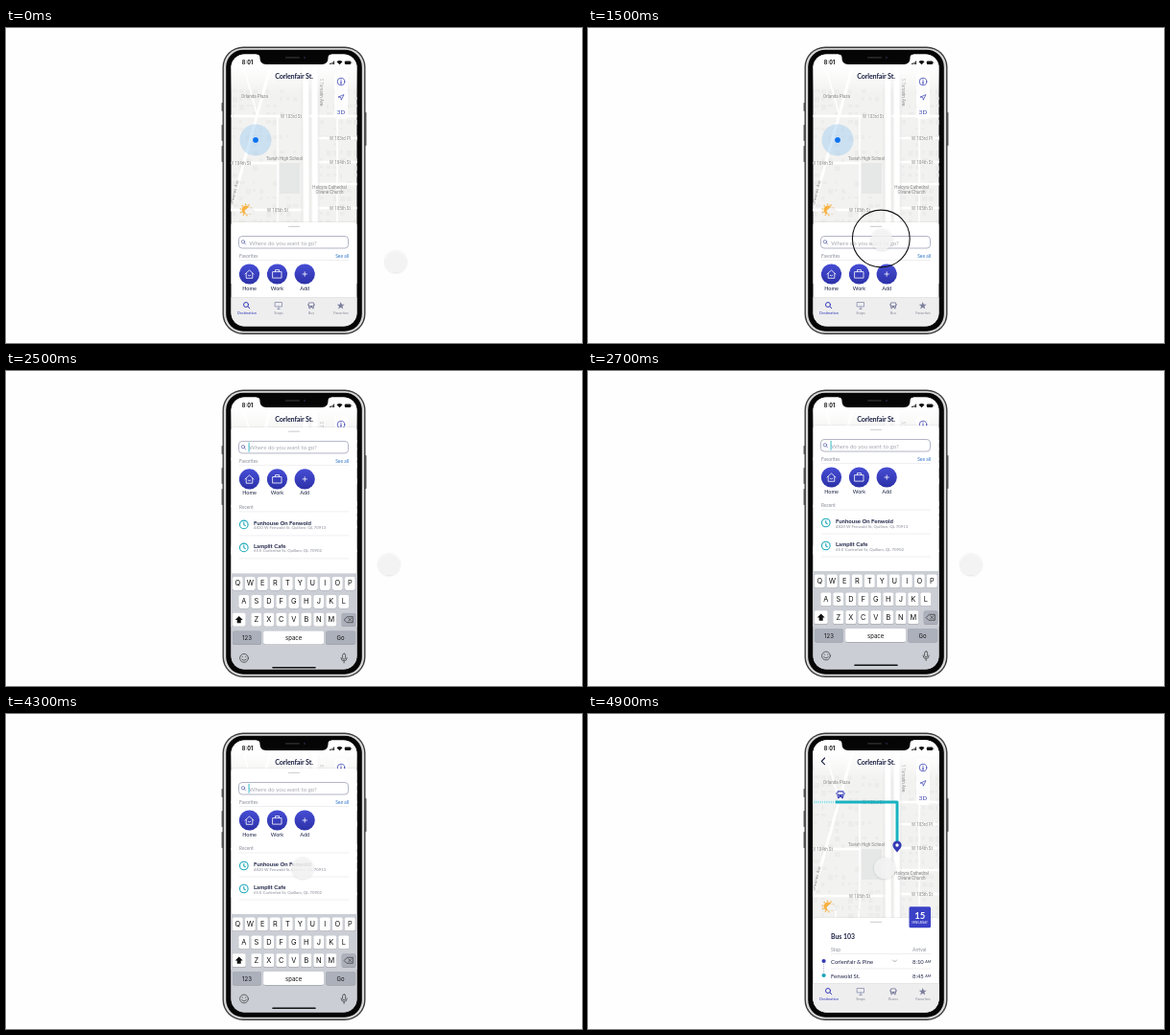
An HTML page that plays this animation: 600 px wide and 329 px high, repeating every 5000 ms.

```html
<!DOCTYPE html>
<html lang="en">
<head>
<meta charset="utf-8">
<title>Transit app demo</title>
<style>
  html, body { margin: 0; height: 100%; overflow: hidden; background: #fefefe; }
  svg { display: block; width: 100vw; height: 100vh; font-family: Lato, sans-serif; }
  text { dominant-baseline: central; }
  .ink { fill: #1c2244; }
  .mid { text-anchor: middle; }
  .end { text-anchor: end; }
  .bold { font-weight: 700; }
  .street { font: 4.5px Roboto, sans-serif; fill: #858585; text-anchor: middle; }
  .grey { fill: #8a8d99; }
  .key { font: 7.4px Inter, sans-serif; fill: #111; text-anchor: middle; }
  .line { fill: none; stroke-linecap: round; stroke-linejoin: round; }
</style>
</head>
<body>
<svg viewBox="0 0 600 329" preserveAspectRatio="none">
  <defs>
    <clipPath id="screen"><rect x="234.5" y="27.5" width="131" height="284" rx="14"/></clipPath>
    <linearGradient id="haze" x2="0" y2="1">
      <stop offset=".3" stop-color="#fff"/><stop offset="1" stop-color="#fff" stop-opacity="0"/>
    </linearGradient>
    <linearGradient id="indigo" x2="0" y2="1">
      <stop stop-color="#464dd4"/><stop offset="1" stop-color="#2c31a8"/>
    </linearGradient>
    <filter id="soft" x="-50%" y="-50%" width="200%" height="200%">
      <feDropShadow dx="0" dy=".5" stdDeviation=".8" flood-opacity=".2"/>
    </filter>

    <g id="map">
      <rect x="234" y="27" width="132" height="240" fill="#f2f2f1"/>
      <g id="blocks" fill="#ececeb"></g>
      <rect x="285" y="141" width="21" height="32" fill="#e6e7e7"/>
      <g class="line" stroke="#fff">
        <path stroke-width="2.600" d="M234 92H366M234 141H283M234 190H308M326 115H366M326 140H366M326 163H366M326 188H366"/>
        <path stroke-width="1.600" d="M283 92V203M258 206V240M282 206V240M345 92V240M244 28L262 92"/>
        <path stroke-width="3" d="M279 28L234 190"/>
        <path stroke-width="5.500" d="M312 28L313 240M321.500 28L322 240"/>
      </g>
      <path d="M316.700 28V240M308 28V240M326 28V240" stroke="#e6e6e6" stroke-width=".7"/>
      <g class="street">
        <text x="259" y="71">Orlanda Plaza</text>
        <text x="297" y="92">W 103rd St</text>
        <text x="348" y="115">W 103rd Pl</text>
        <text x="244" y="141.500">W 104th St</text>
        <text x="348" y="140">W 104th St</text>
        <text x="290" y="136.500">Tavish High School</text>
        <text x="337" y="166.700">Halcyra Cathedral</text>
        <text x="337" y="171.700">Olvane Church</text>
        <text x="283" y="190">W 105th St</text>
        <text x="348" y="188.500">W 105th St</text>
        <text transform="translate(328 67) rotate(90)">S Tamarin Ave</text>
        <text transform="translate(238 172) rotate(-76)">Orwenes Ave</text>
      </g>
      <rect x="234" y="27" width="132" height="42" fill="url(#haze)"/>
      <rect x="342" y="47" width="14" height="48" rx="3" fill="#fff" fill-opacity=".85"/>
      <g class="line" stroke="#3b44b4" stroke-width=".8">
        <circle cx="349" cy="56" r="3.800"/>
        <path stroke-width="1.200" d="M349 54v.1M349 55.800v2.400"/>
        <path stroke-width=".7" d="M346.300 72L352 69.600L349.300 75.200L348.800 72.600Z"/>
      </g>
      <text class="mid" x="349" y="87.300" font-size="6.200" fill="#3b44b4">3D</text>
    </g>

    <g id="weather">
      <circle r="5.800" fill="none" stroke="#f6b24a" stroke-width="1.400" stroke-dasharray="1.300 2.340"/>
      <circle r="4.500" fill="#f8b13d"/>
      <path d="M.5 4a2.500 2.500 0 0 1 0 -4.800a3.300 3.300 0 0 1 6 .2a2.300 2.300 0 0 1 0 4.600Z" fill="#f3f3f3" stroke="#ddd" stroke-width=".3"/>
    </g>
    <g id="bus">
      <rect x="-3" y="-3.300" width="6" height="5.800" rx="1"/>
      <path d="M-2.500 2h1.500v1.600h-1.500zM1 2h1.500v1.600h-1.500zM-3.900 -1.800h.6v2h-.6zM3.300 -1.800h.6v2h-.6z"/>
      <path d="M-2.200 -2.200h4.400v2.200h-4.400zM-2.100 1h1v.8h-1zM1.100 1h1v.8h-1z" fill="#fff"/>
    </g>
    <g id="tabs">
      <rect x="234" y="281.500" width="132" height="31" fill="#eeeeef" fill-opacity=".95"/>
      <path d="M234 281.500H366" stroke="#d2d2d5" stroke-width=".5"/>
      <g class="line" stroke="#373fb8" stroke-width="1"><circle cx="250" cy="289" r="2.500"/><path d="M252 291L253.800 292.800"/></g>
      <path class="line" stroke="#8a8eae" stroke-width=".8" d="M280.500 286.500h7v4.500h-7zM284 291v2.500M282.800 293.500h2.400"/>
      <use href="#bus" x="318" y="289.700" fill="#8083a0"/>
      <path d="M0 -4L1.100 -1.300L4 -1.200L1.700 .6L2.500 3.400L0 1.800L-2.500 3.400L-1.700 .6L-4 -1.200L-1.100 -1.300Z" transform="translate(348.700 290)" fill="#7b7e9c"/>
      <g class="mid grey" font-size="3.900">
        <text x="251" y="297.500" fill="#373fb8">Destination</text>
        <text x="284" y="297.500">Stops</text>
        <text x="349" y="297.500">Favorites</text>
      </g>
    </g>
    <g id="panel">
      <path d="M234 130V4a4 4 0 0 1 4 -4H362a4 4 0 0 1 4 4V270H234Z" fill="#fff" filter="url(#soft)"/>
      <path class="line" d="M294.500 4.300H305.500" stroke="#d4d4d8" stroke-width="1.200"/>
    </g>
  </defs>

  <g fill="#666">
    <rect x="224.500" y="78" width="2" height="9" rx=".7"/>
    <rect x="224.500" y="101" width="2" height="17" rx=".7"/>
    <rect x="224.500" y="123" width="2" height="17" rx=".7"/>
    <rect x="373.500" y="88" width="2" height="35" rx=".7"/>
  </g>
  <rect x="225.500" y="19.500" width="149" height="300.500" rx="21.500" fill="#3c3c3c"/>
  <rect x="226.900" y="20.900" width="146.200" height="297.700" rx="20" fill="#d9d9d9"/>
  <rect x="229.200" y="22.700" width="141.600" height="294" rx="18" fill="#050505"/>

  <g clip-path="url(#screen)" class="ink">
    <use href="#map"/>
    <circle cx="260" cy="117" r="16.500" fill="#8fc2ee" fill-opacity=".4"/>
    <circle cx="260" cy="117" r="3.500" fill="#0d72ee" stroke="#fff" stroke-width=".8"/>
    <use href="#weather" id="sun"/>

    <g id="sheet">
      <use href="#panel"/>
      <rect x="242.500" y="14.500" width="114" height="12.500" rx="3.500" fill="#fff" stroke="#a0a3b8" stroke-width=".8"/>
      <g class="line" stroke="#5b63a8" stroke-width=".7"><circle cx="247" cy="20.300" r="1.700"/><path d="M248.300 21.600L249.700 23"/></g>
      <text x="253.200" y="21" font-size="6.100" fill="#a8a9b1">Where do you want to go?</text>
      <rect id="caret" x="252.600" y="15.800" width=".9" height="9.800" fill="#1fb4c4"/>
      <text class="grey" x="243" y="35" font-size="4.900">Favorites</text>
      <text class="end" x="357" y="35" font-size="4.900" fill="#2a72c8">See all</text>
      <path d="M243 39.500H357" stroke="#e4e4e8" stroke-width=".6"/>
      <g fill="url(#indigo)"><circle cx="253.500" cy="54" r="10.600"/><circle cx="282.500" cy="54" r="10.600"/><circle cx="311.200" cy="54" r="10.600"/></g>
      <g class="line" stroke="#fff" stroke-width=".8">
        <path d="M249 54L253.500 50L258 54M250.200 53.500V58.300H256.800V53.500M252.200 55.300q1.300 1.300 2.600 0"/>
        <path d="M278 51.600h9v6.500h-9zM280.500 51.500v-1.900h4v1.900"/>
        <path d="M309 54h4.400M311.200 51.800v4.400"/>
      </g>
      <g class="mid" font-size="5.500">
        <text x="253.500" y="68.500">Home</text><text x="282.500" y="68.500">Work</text><text x="311.200" y="68.500">Add</text>
      </g>
      <g id="recent">
        <text class="grey" x="243" y="83" font-size="4.900">Recent</text>
        <path d="M243 88H357M243 113H357M243 137H357" stroke="#e4e4e8" stroke-width=".6"/>
      </g>
    </g>
    <g id="bar">
      <use href="#tabs"/>
      <text class="mid grey" x="318" y="297.500" font-size="3.900">Bus</text>
    </g>
    <g id="keyboard"><rect x="234" y="209" width="132" height="104" fill="#cbced5"/></g>

    <g id="trip">
      <use href="#map"/>
      <path d="M235 92H258" stroke="#8fdde4" stroke-width="2.400" stroke-dasharray="1.300 .9"/>
      <path d="M258 92H322V133" fill="none" stroke="#18b2c0" stroke-width="3" stroke-linejoin="round"/>
      <use href="#bus" fill="#3a40b8" transform="translate(263 84) scale(1.150)"/>
      <path d="M322 144.500C319.500 141 317.400 139.500 317.400 137a4.600 4.600 0 0 1 9.200 0C326.600 139.500 324.500 141 322 144.500Z" fill="#343ab4"/>
      <circle cx="322" cy="137" r="1.700" fill="#fff"/>
      <use href="#weather" x="250" y="201"/>
      <use href="#panel" y="213"/>
      <rect x="334.500" y="201.300" width="22.500" height="22" rx="1.500" fill="#3a41c6"/>
      <g class="mid" fill="#fff">
        <text class="bold" x="345.700" y="210" font-size="9.500">15</text>
        <text x="345.700" y="217.800" font-size="2.900">MINS AWAY</text>
      </g>
      <text class="bold" x="253" y="232" font-size="6.900">Bus 103</text>
      <g font-size="5" class="grey"><text x="253" y="246">Stop</text><text x="338" y="246">Arrival</text></g>
      <path d="M253 250.500H357M253 266H357" stroke="#e2e2e6" stroke-width=".6"/>
      <g font-size="5.900">
        <text x="253" y="258">Corlenfair &amp; Pine</text><text x="253" y="273">Fenwold St.</text>
        <text x="338" y="258">8:10 <tspan font-size="3.700">AM</tspan></text><text x="338" y="273">8:45 <tspan font-size="3.700">AM</tspan></text>
      </g>
      <path class="line" d="M317.500 257L319.500 259L321.500 257" stroke="#888" stroke-width=".7"/>
      <path d="M245.600 261V270" stroke="#9a9db8" stroke-width=".8" stroke-dasharray="1 1"/>
      <circle cx="245.600" cy="258" r="2.100" fill="#343ab4"/>
      <circle cx="245.600" cy="273" r="2.100" fill="#18a5b8"/>
      <use href="#tabs"/>
      <text class="mid grey" x="318" y="297.500" font-size="3.900">Buses</text>
      <path class="line" d="M246.500 46L243.300 49.300L246.500 52.600" stroke="#1c2244" stroke-width="1.200"/>
    </g>

    <text class="mid bold" x="300" y="50" font-size="7.200" letter-spacing="-.15">Corlenfair St.</text>
    <text class="mid bold" x="251.500" y="36" font-size="5.500" font-family="Inter, sans-serif" fill="#111">8:01</text>
    <g fill="#111">
      <path d="M337 37h.9v1h-.9zM338.400 36.300h.9v1.700h-.9zM339.800 35.400h.9v2.600h-.9zM341.200 34.500h.9v3.500h-.9z"/>
      <path d="M347.500 38.300L344.500 35.300a4.200 4.200 0 0 1 6 0Z"/>
      <rect x="352.800" y="34.500" width="6.400" height="3.500" rx="1"/><rect x="359.600" y="35.500" width=".6" height="1.400"/>
    </g>
  </g>
  <path d="M261 27H339V27.500Q335.500 27.500 335.500 31V31.500Q335.500 38 329 38H271Q264.500 38 264.500 31.500V31Q264.500 27.500 261 27.500Z" fill="#050505"/>
  <rect x="291" y="30" width="15" height="1.800" rx=".9" fill="#262626"/><circle cx="311" cy="30.900" r="1.200" fill="#1b1f33"/>

  <circle id="ring" fill="none" stroke="#111" stroke-width="1.100"/>
  <circle id="finger" r="11" fill="#f5f5f5" fill-opacity=".85" filter="url(#soft)"/>
</svg>
<script>
const $ = id => document.getElementById(id);
const clamp = x => Math.min(1, Math.max(0, x));
const span = (t, from, to) => clamp((t - from) / (to - from));
const inOut = x => x < .5 ? 4 * x ** 3 : 1 - 4 * (1 - x) ** 3;
const out = x => 1 - (1 - x) ** 3;
const add = (id, markup) => $(id).insertAdjacentHTML('beforeend', markup);

// Faint buildings scattered over the map
let seed = 7;
const rand = () => (seed = seed * 16807 % 2147483647) / 2147483647;
for (let y = 64; y < 215; y += 8)
  for (let x = 236; x < 364; x += 7)
    if (rand() < .6 && (x < 302 || x > 326))
      add('blocks', `<rect x="${x}" y="${y}" width="${2 + 4 * rand()}" height="${2 + 4 * rand()}"/>`);

[['Funhouse On Fenwold', '4820 W Fenwold St, Quillam, QL 70913', 101.5],
 ['Lamplit Cafe', '65 E Corlenfair St, Quillam, QL 70902', 125.5]].forEach(([name, place, y]) =>
  add('recent', `<g class="line" stroke="#1aa9b8" stroke-width="1.1"><circle cx="247.8" cy="${y}" r="4.3"/>
    <path d="M247.800 ${y - 2.3}v2.500l1.500 1"/></g>
    <text class="bold" x="258" y="${y - 2}" font-size="6">${name}</text>
    <text class="grey" x="258" y="${y + 3.6}" font-size="4.3">${place}</text>`));

const key = (x, y, w, label = '', fill = '#fff', size = 7.4) => add('keyboard',
  `<rect x="${x - w / 2}" y="${y - 6.6}" width="${w}" height="14" rx="1.8" fill="#898c92"/>
   <rect x="${x - w / 2}" y="${y - 7}" width="${w}" height="14" rx="1.8" fill="${fill}"/>
   <text class="key" x="${x}" y="${y}" style="font-size:${size}px">${label}</text>`);
const dark = '#abb0bb';
[['QWERTYUIOP', 241.3, 219.5], ['ASDFGHJKL', 247.8, 238.5], ['ZXCVBNM', 260.8, 257.3]].forEach(([row, x, y]) =>
  [...row].forEach((c, i) => key(x + i * 13, y, 11, c)));
key(242.7, 257.3, 14);
key(357, 257.3, 14.5, '', dark);
key(251, 276, 30, '123', dark, 6);
key(299.6, 276, 63, 'space', '#fff', 6);
key(348.6, 276, 31, 'Go', dark, 6);
add('keyboard', `<path d="M242.700 253.500l4 4h-2v3.300h-4v-3.300h-2z" fill="#111"/>
  <g class="line" stroke="#444" stroke-width=".8">
    <path d="M352.500 257.300l2.800 -3h6v6h-6zM356.700 255.800l3 3m0 -3l-3 3"/>
    <circle cx="248" cy="297.500" r="4.400"/><path d="M246.300 296v.3M249.700 296v.3M245.700 298.800q2.300 2.600 4.600 0"/>
    <rect x="350.600" y="292.800" width="3" height="6" rx="1.500"/><path d="M349 297q0 3.500 3.100 3.500t3.100 -3.500M352.100 300.500v2"/>
  </g><path class="line" d="M278 307.300H322" stroke="#111" stroke-width="1.600"/>`);

// Each move: start, end, easing, then the point reached
const start = [406, 244];
const moves = [[700, 1250, inOut, 306, 221], [1900, 2520, out, 399, 202], [3100, 3650, inOut, 309, 161]];
const fingerAt = t => moves.reduce(([x, y], [a, b, ease, tx, ty]) => {
  const k = ease(span(t, a, b));
  return [x + (tx - x) * k, y + (ty - y) * k];
}, start);
const taps = [1300, 3850];

const set = (id, attrs) => Object.entries(attrs).forEach(([k, v]) => $(id).setAttribute(k, v));

function draw(now) {
  const t = now % 5000;
  const top = 203 - 146 * inOut(span(t, 1990, 2590));
  set('sheet', { transform: `translate(0 ${top})` });
  set('sun', { transform: `translate(250 ${top - 13})`, opacity: 1 - span(t, 1950, 2150) });
  set('recent', { opacity: span(t, 2000, 2150) });
  set('caret', { opacity: span(t, 2100, 2400) });
  set('bar', { opacity: 1 - span(t, 2100, 2500) });
  set('keyboard', { transform: `translate(0 ${105 * (1 - out(span(t, 2250, 2600)))})` });
  set('trip', { opacity: inOut(span(t, 4600, 4900)) });

  const [x, y] = fingerAt(t);
  set('finger', { cx: x, cy: y });
  const tap = taps.find(s => t >= s && t < s + 400);
  const age = tap ? t - tap : 0;
  set('ring', { cx: x - .7, cy: y - 1, r: 31 * out(span(age, 0, 300)), opacity: tap ? 1 - span(age, 220, 400) : 0 });
  requestAnimationFrame(draw);
}
requestAnimationFrame(draw);
</script>
</body>
</html>
```
